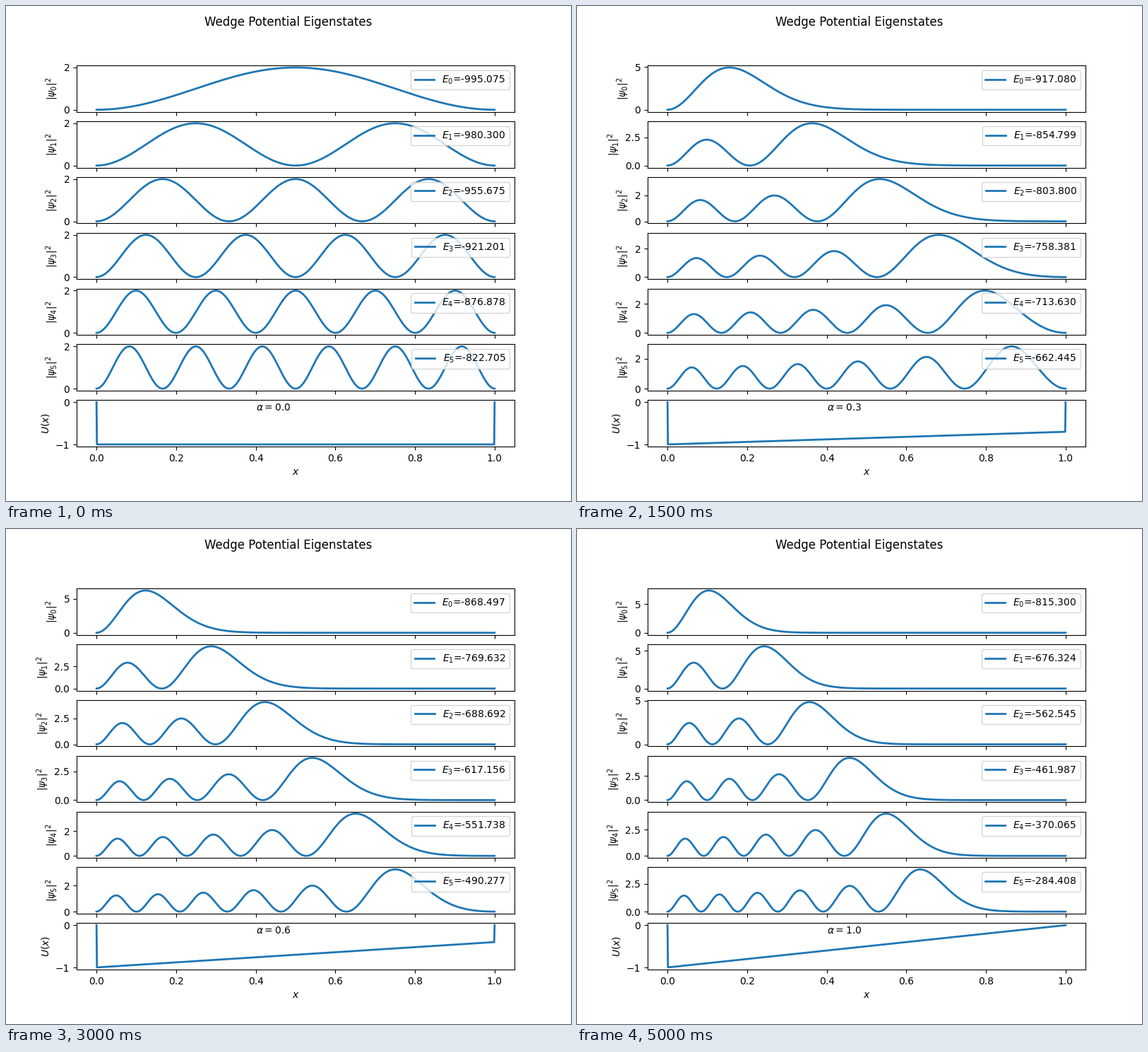
Animation, 800 px wide and 700 px high, one loop 5500 ms. Source, as a matplotlib script:

```python
import numpy as np
import matplotlib.pyplot as plt
from matplotlib.animation import FuncAnimation

POINTS, MODES, STATES = 1001, 200, 6
DEPTH = 1000.0
FRAMES, INTERVAL = 11, 500

x = np.linspace(0, 1, POINTS)
dx = 1 / POINTS

# Sine modes diagonalise the finite-difference kinetic term.
mode = np.arange(1, MODES + 1)
theta = np.pi * mode / (POINTS + 1)
basis = np.sqrt(2 / (POINTS + 1)) * np.sin(np.outer(np.arange(1, POINTS + 1), theta))
kinetic = np.diag((1 - np.cos(theta)) / dx**2)


def potential(alpha):
    u = DEPTH * (alpha * x - 1)
    u[[0, -1]] = 0
    return u


def solve(alpha):
    """Return the potential, lowest energies and probability densities."""
    u = potential(alpha)
    energy, coef = np.linalg.eigh(kinetic + basis.T @ (u[:, None] * basis))
    density = (basis @ coef[:, :STATES])**2 / dx
    return u, energy[:STATES], density.T


alphas = np.arange(FRAMES) / (FRAMES - 1)
solutions = [solve(a) for a in alphas]

plt.rcParams["font.family"] = "DejaVu Sans"
fig, axes = plt.subplots(STATES + 1, 1, sharex=True, figsize=(8, 7), dpi=100)
fig.suptitle("Wedge Potential Eigenstates")
*state_axes, well_ax = axes


def energy_label(n, energy):
    return f"$E_{n}$={energy:.3f}"


u0, energy0, density0 = solutions[0]
lines, labels = [], []
for n, ax in enumerate(state_axes):
    line, = ax.plot(x, density0[n], lw=2, label=energy_label(n, energy0[n]))
    ax.set_ylabel(rf"$|\psi_{n}|^2$")
    lines.append(line)
    labels.append(ax.legend(loc="upper right").get_texts()[0])

well, = well_ax.plot(x, u0 / DEPTH, lw=2)
well_ax.set_xlabel("$x$")
well_ax.set_ylabel("$U(x)$")
alpha_text = well_ax.text(0.4, -0.2, "")


def update(i):
    u, energy, density = solutions[i]
    for n, ax in enumerate(state_axes):
        lines[n].set_ydata(density[n])
        labels[n].set_text(energy_label(n, energy[n]))
        ax.relim()
        ax.autoscale_view()
    well.set_ydata(u / DEPTH)
    alpha_text.set_text(rf"$\alpha={alphas[i]:.1f}$")
    return [*lines, *labels, well, alpha_text]


anim = FuncAnimation(fig, update, frames=FRAMES, interval=INTERVAL,
                     repeat=True, repeat_delay=0, blit=False)
plt.show()
```
